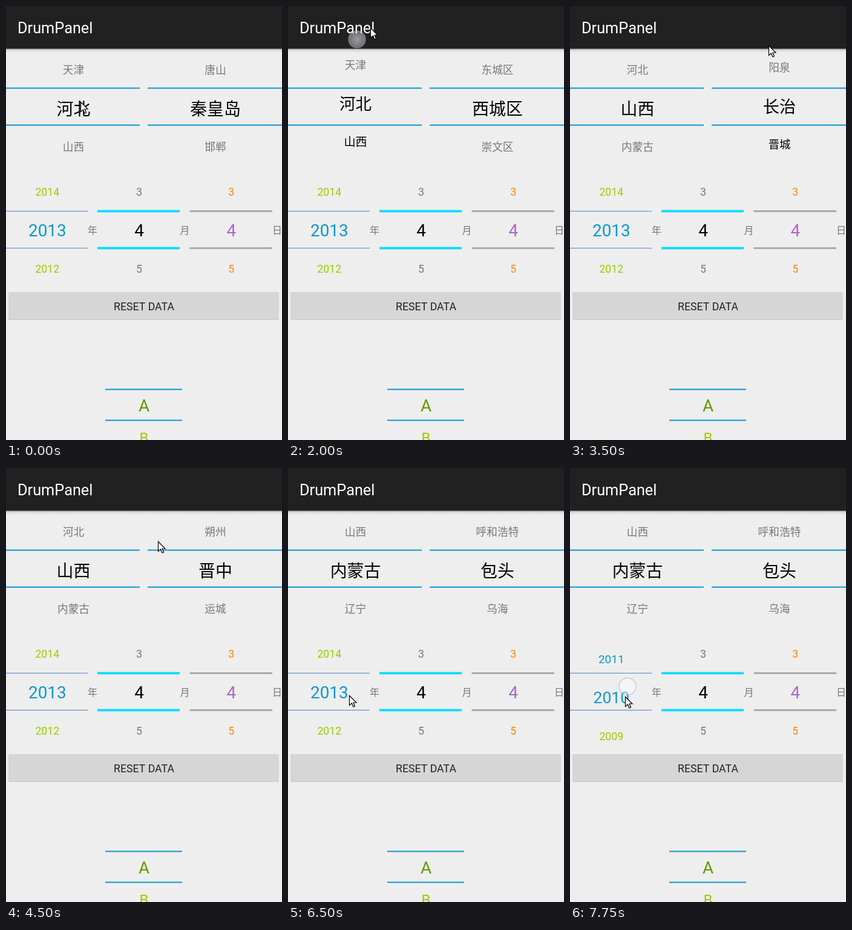
Write an HTML page with a canvas that moves like this. It is 456 px wide and 716 px high and loops after 8000 ms.

```html
<!DOCTYPE html>
<html lang="zh-CN">
<head>
<meta charset="utf-8">
<title>DrumPanel</title>
<style>
html, body { margin: 0; width: 456px; height: 716px; overflow: hidden; background: #eee; }
canvas { display: block; }
</style>
</head>
<body>
<canvas id="stage" width="456" height="716"></canvas>
<script>
const ctx = document.getElementById('stage').getContext('2d');
const LOOP = 8000, STEP = 250, ROW = 63.5;
const BIG = 27.9, SMALL = 17.7;
const BLUE = '#0a99cf', GRAY = '#777';
const FONT = 'Roboto, "Noto Sans CJK SC", "Noto Sans CJK", sans-serif';

// All times below are in steps of 250 ms; hold is how long the finger stays down.
const swipe = (at, length, to, hold) => ({ at, length, to, hold });

const provinces = [
  { name: '北京', cities: ['东城区', '西城区', '崇文区', '宣武区'] },
  { name: '天津', cities: ['和平区', '河东区', '河西区'] },
  { name: '河北', cities: ['石家庄', '唐山', '秦皇岛', '邯郸', '邢台'], start: 2 },
  { name: '山西', cities: ['太原', '大同', '阳泉', '长治', '晋城', '朔州', '晋中', '运城', '忻州'],
    swipes: [swipe(12.62, 5.38, 6, 1)] },
  { name: '内蒙古', cities: ['呼和浩特', '包头', '乌海', '赤峰'] },
  { name: '辽宁', cities: ['沈阳', '大连', '鞍山'] }
];
const years = Array.from({ length: 8 }, (_, i) => String(2015 - i));
const numbers = Array.from({ length: 12 }, (_, i) => String(i + 1));

const provinceSwipes = [swipe(.3, 2.7, 0, 1.8), swipe(6, 4, 3, 2), swipe(20, 3, 4, 2)];
const yearSwipes = [swipe(26, 4, 5, 2.5), swipe(30.7, 4, 4, 2)];
const allSwipes = [...provinceSwipes, ...yearSwipes, ...provinces.flatMap(p => p.swipes || [])];

// Turning points of the cursor: [time, x, y]
const path = [[0, 123, 158], [2, 125, 345], [4, 207, 217], [6, 112, 218], [7.8, 114, 55],
  [8, 136, 36], [10, 342, 212], [13, 332, 30], [14, 328, 65], [16, 320, 58], [18, 251, 121],
  [20, 130, 240], [23, 115, 72], [25, 103, 381], [26, 101, 375], [29, 95, 32],
  [30.7, 97, 352], [31, 91, 377]];

function cursorAt(time) {
  const next = Math.max(1, path.findIndex(p => p[0] >= time));
  const [t0, x0, y0] = path[next - 1], [t1, x1, y1] = path[next];
  const mix = (time - t0) / (t1 - t0);
  return [x0 + (x1 - x0) * mix, y0 + (y1 - y0) * mix];
}

const easeOut = t => 1 - (1 - t) ** 1.8;

function position(start, swipes, time) {
  return swipes.filter(s => time > s.at).reduce(
    (pos, s) => pos + (s.to - pos) * easeOut(Math.min(1, (time - s.at) / s.length)), start);
}

function rect(x, y, w, h, color) {
  ctx.fillStyle = color;
  ctx.fillRect(x, y, w, h);
}

function text(str, x, y, size, color, align = 'center') {
  ctx.font = `${size}px ${FONT}`;
  ctx.textAlign = align;
  ctx.fillStyle = color;
  ctx.fillText(str, x, y);
}

function bars(x, w, y, gap, thickness, color) {
  for (const top of [y, y + gap]) rect(x, top - thickness / 2, w, thickness, color);
}

// rise: height of the glyph centre above the baseline, in em
function wheel(items, pos, x, y, rise, color, selected) {
  ctx.save();
  ctx.beginPath();
  ctx.rect(0, y - 95, 456, 190);
  ctx.clip();
  items.forEach((item, i) => {
    const d = i - pos, near = Math.max(0, 1 - Math.abs(d));
    if (Math.abs(d) > 2) return;
    const size = SMALL + (BIG - SMALL) * near;
    text(item, x, y + d * ROW + size * rise, size, near > 0 ? selected : color);
  });
  ctx.restore();
}

function touch(x, y) {
  const glow = ctx.createRadialGradient(x, y, 0, x, y, 14);
  glow.addColorStop(0, 'rgba(255,255,255,.55)');
  glow.addColorStop(1, 'rgba(255,255,255,.35)');
  ctx.beginPath();
  ctx.arc(x, y, 14, 0, Math.PI * 2);
  ctx.fillStyle = glow;
  ctx.fill();
  ctx.lineWidth = 1.5;
  ctx.strokeStyle = 'rgba(160,160,210,.5)';
  ctx.stroke();
}

function cursor(x, y) {
  ctx.save();
  ctx.translate(x + .5, y + .5);
  const arrow = new Path2D('M0 0V16L4 12.5L6.5 18.5L9 17.5L6.5 11.5H11.5Z');
  ctx.fillStyle = '#fff';
  ctx.fill(arrow);
  ctx.lineWidth = 1.2;
  ctx.strokeStyle = '#000';
  ctx.stroke(arrow);
  ctx.restore();
}

function header() {
  const shadow = ctx.createLinearGradient(0, 70, 0, 77);
  shadow.addColorStop(0, '#999');
  shadow.addColorStop(.4, '#d8d8d8');
  shadow.addColorStop(1, '#eee');
  rect(0, 70, 456, 7, shadow);
  rect(0, 0, 456, 70.5, '#212121');
  text('DrumPanel', 19, 45, 25.3, '#fff', 'left');
}

function button() {
  for (const [height, color] of [[46, '#c8c8c8'], [45, '#d6d6d6']]) {
    ctx.beginPath();
    ctx.roundRect(4, 472, 447, height, 2);
    ctx.fillStyle = color;
    ctx.fill();
  }
  text('RESET DATA', 228, 502, SMALL, '#212121');
}

function areaWheels(time) {
  // The cities change only after the province wheel has come to rest.
  const settled = provinceSwipes.filter(s => time >= s.at + s.length).pop();
  const { cities, start = 1, swipes = [] } = provinces[settled ? settled.to : 2];
  const names = provinces.map(p => p.name);
  wheel(names, position(2, provinceSwipes, time), 111.5, 168.2, .43, GRAY, '#000');
  wheel(cities, position(start, swipes, time), 346, 168.2, .43, GRAY, '#000');
  bars(0, 221, 135.5, 61, 2, BLUE);
  bars(234, 222, 135.5, 61, 2, BLUE);
}

function dateWheels(time) {
  wheel(years, position(2, yearSwipes, time), 68.3, 370.5, .355, '#99cc00', BLUE);
  wheel(numbers, 3, 220, 370.5, .355, GRAY, '#000');
  wheel(numbers, 3, 372.3, 370.5, .355, '#ff8800', '#aa66cc');
  bars(0, 135, 338.5, 61, 1.3, '#6f94d2');
  bars(151, 136, 338.5, 61, 3.8, '#00ddff');
  bars(303.5, 136.5, 338.5, 61, 3, '#aaa');
  ['年', '月', '日'].forEach((unit, i) => text(unit, 143 + i * 152.5, 375.5, 16, GRAY));
}

function draw(time) {
  rect(0, 0, 456, 716, '#eee');
  header();
  areaWheels(time);
  dateWheels(time);
  button();
  bars(164, 127, 632.5, 51, 2, BLUE);
  text('A', 228, 669, BIG, '#669900');
  text('B', 228, 721, 24, '#99cc00');

  // The touch spot trails slightly behind the cursor.
  if (allSwipes.some(s => time > s.at && time <= s.at + s.hold)) touch(...cursorAt(time - .2));
  cursor(...cursorAt(time));
}

function frame(now) {
  draw(Math.floor(now % LOOP / STEP));
  requestAnimationFrame(frame);
}
requestAnimationFrame(frame);
</script>
</body>
</html>
```
